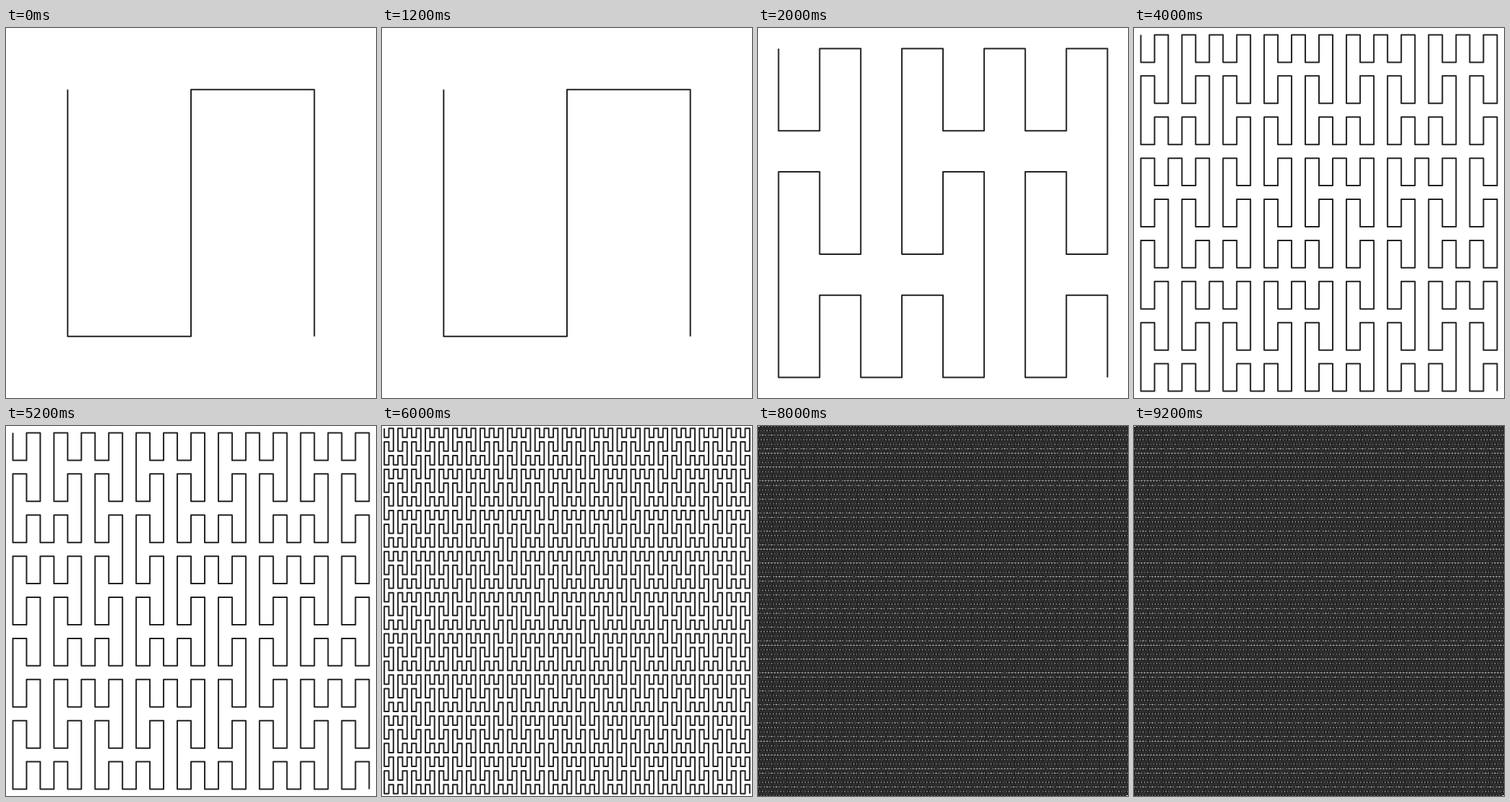
An HTML page with a canvas for the animation above (10 s loop, 512 px wide and 512 px high).

```html
<!DOCTYPE html>
<html lang="en">
<head>
<meta charset="utf-8">
<title>Peano curve</title>
<style>
  html, body { margin: 0; width: 100%; height: 100%; overflow: hidden; background: #fff; }
  canvas { display: block; }
</style>
</head>
<body>
<canvas id="stage" width="512" height="512"></canvas>
<script>
const SIZE = 512, ORDERS = 5, HOLD = 2000;

// Nine copies in a column-wise serpentine, mirrored so that their ends meet.
function refine(points, side) {
  const next = [];
  for (let col = 0; col < 3; col++) {
    for (let step = 0; step < 3; step++) {
      const row = col % 2 ? 2 - step : step;
      for (const [x, y] of points) {
        next.push([
          col * side + (row % 2 ? side - 1 - x : x),
          row * side + (col % 2 ? side - 1 - y : y)
        ]);
      }
    }
  }
  return next;
}

function render(points, side) {
  const canvas = document.createElement("canvas");
  canvas.width = canvas.height = SIZE;
  const ctx = canvas.getContext("2d");
  const cell = SIZE / side;
  ctx.fillStyle = "#fff";
  ctx.fillRect(0, 0, SIZE, SIZE);
  ctx.strokeStyle = "#222";
  ctx.lineWidth = 2;
  ctx.lineJoin = "round";
  ctx.beginPath();
  for (const [x, y] of points) ctx.lineTo((x + 0.5) * cell, (y + 0.5) * cell);
  ctx.stroke();
  return canvas;
}

const curves = [];
let points = [[0, 0]], side = 1;
for (let order = 0; order < ORDERS; order++) {
  points = refine(points, side);
  side *= 3;
  curves.push(render(points, side));
}

const stage = document.getElementById("stage").getContext("2d");
const start = performance.now();

function draw() {
  const time = performance.now() - start;
  stage.drawImage(curves[Math.floor(time / HOLD) % ORDERS], 0, 0);
  requestAnimationFrame(draw);
}
draw();
</script>
</body>
</html>
```
